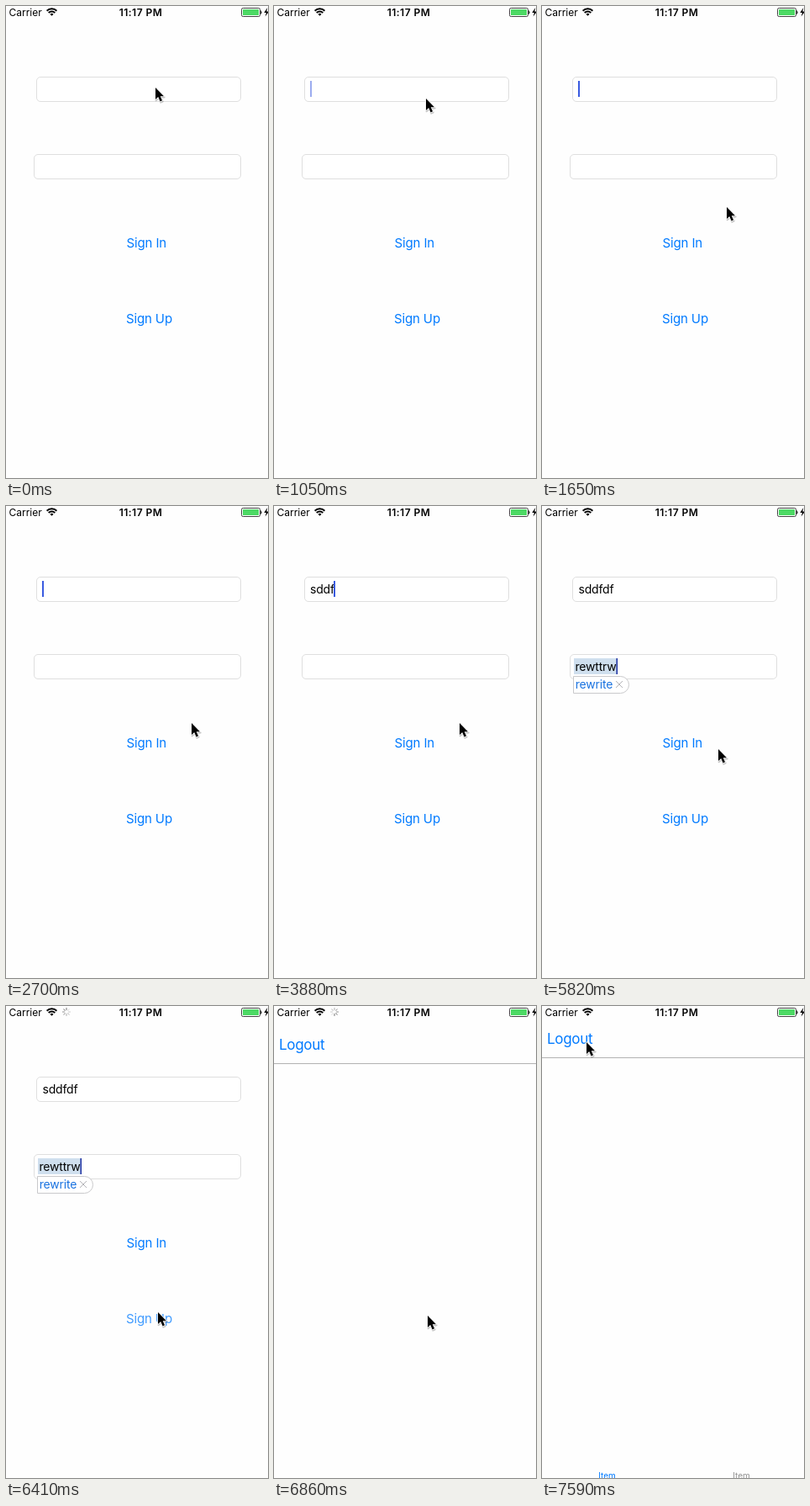
Animation of 312x561 px, one loop 8 s. Source, as an HTML page:

```html
<!DOCTYPE html>
<html lang="en">
<head>
<meta charset="utf-8">
<title>Sign in flow</title>
<style>
  html, body { margin: 0; width: 100%; height: 100%; overflow: hidden; background: #fefefe; }
  svg { display: block; width: 312px; height: 561px; }
  text { font-family: Inter, Roboto, "Liberation Sans", sans-serif; white-space: pre; }
  .field { fill: #fff; stroke: #dfdfdf; }
  .input { font-size: 14px; letter-spacing: -0.2px; }
  .button { font-size: 15px; letter-spacing: -0.15px; fill: #007aff; text-anchor: middle; }
  .status { font-size: 12px; }
  .clock { font-weight: 600; letter-spacing: 0.45px; text-anchor: middle; }
  .tab { font-size: 10px; text-anchor: middle; }
</style>
</head>
<body>
<svg viewBox="0 0 312 561">
  <rect width="312" height="561" fill="#fefefe"/>

  <g id="form">
    <rect class="field" x="36.5" y="84.5" width="243" height="29" rx="4.5"/>
    <rect class="field" x="33.5" y="176.5" width="246" height="29" rx="4.5"/>
    <rect id="mark" x="38" y="181" width="52" height="19" fill="#cfdfee"/>
    <text id="user" class="input" x="43" y="103.5"></text>
    <text id="pass" class="input" x="39.5" y="195.5"></text>
    <rect id="caret" width="2" height="19"/>
    <g id="hint">
      <path d="M37.5 202.5H93.5a10 10 0 0 1 0 20H37.5Z" fill="#fff" stroke="#c9c9cb"/>
      <text class="input" x="39.7" y="217" fill="#1a73e0">rewrite</text>
      <path d="M88 208l8 8m0-8l-8 8" stroke="#b4b4b8" fill="none"/>
    </g>
    <text class="button" x="167.3" y="286.5">Sign In</text>
    <text id="signUp" class="button" x="170.5" y="376.5">Sign Up</text>
  </g>

  <g id="modal">
    <rect width="312" height="580" fill="#fefefe"/>
    <rect y="61" width="312" height="1" fill="#b2b2b2"/>
    <text x="6" y="45" font-size="17" letter-spacing="-0.3" fill="#007aff">Logout</text>
    <text class="tab" x="77.5" y="561.5" fill="#007aff">Item</text>
    <text class="tab" x="237.5" y="561.5" fill="#929292">Item</text>
  </g>

  <text class="status" x="3.5" y="11.5">Carrier</text>
  <g fill="none" stroke="#000" stroke-width="1.9">
    <path d="M48.6 5.7a8.4 8.4 0 0 1 11.8 0M50.7 8a5.4 5.4 0 0 1 7.6 0"/>
    <path d="M54.5 11.8l-2-2a2.8 2.8 0 0 1 4 0Z" fill="#000" stroke="none"/>
  </g>
  <g id="spinner" stroke="#777" stroke-linecap="round"></g>
  <text class="status clock" x="160.5" y="11.5">11:17 PM</text>
  <rect x="280.5" y="2.5" width="22" height="10" rx="1.8" fill="#fff" stroke="#444"/>
  <rect x="282" y="4" width="19" height="7" rx="0.6" fill="#4cd964"/>
  <path d="M303.5 5.5q1.6 2 0 4Z" fill="#222" stroke="#222" stroke-width="0.6"/>
  <path d="M311.3 2l-4 6h2.6l-1.2 4.6 4.3-6h-2.7Z"/>

  <g id="cursor">
    <path d="M0 0V14L3.2 11L5.6 16.4L8 15.3L5.7 10.2H10Z" transform="translate(.6 1.2)"
      fill="#000" opacity=".22" stroke="#000" stroke-width="2" stroke-linejoin="round"/>
    <path d="M0 0V14L3.2 11L5.6 16.4L8 15.3L5.7 10.2H10Z"
      fill="#000" stroke="#fff" stroke-width="1.6" stroke-linejoin="round" paint-order="stroke"/>
  </g>
</svg>
<script>
const LOOP = 8000;
const $ = id => document.getElementById(id);

// Critically damped spring for the sheet sliding up.
const slide = t => {
  const u = 18.26 * (t - 6510) / 1000;
  return Math.round(568 * (1 + u) * Math.exp(-u));
};

const start = {
  cursor: [178, 97], user: "", pass: "", userX: 43, caret: [43, 89], blink: 0,
  hint: false, press: 1, spin: -1, sheet: 568
};

// Each step changes only the listed parts.
const steps = [
  [450, { blink: 1 }],
  [1050, { cursor: [181, 110], blink: 0.5 }],
  [1200, { cursor: [191, 143], blink: 0 }],
  [1350, { cursor: [204, 184] }],
  [1500, { cursor: [215, 218], blink: 0.5 }],
  [1650, { cursor: [220, 239], blink: 1 }],
  [1800, { cursor: [221, 251] }],
  [1950, { cursor: [221, 258] }],
  [2100, { blink: 0.5 }],
  [2250, { blink: 0 }],
  [2550, { blink: 0.5 }],
  [2700, { blink: 1 }],
  [3000, { blink: 0.5 }],
  [3140, { blink: 0 }],
  [3580, { user: "sd", caret: [57, 89], blink: 1 }],
  [3880, { user: "sddf", caret: [71, 89] }],
  [4030, { user: "sddfdf", caret: [84, 89] }],
  [4330, { userX: 43.5, caret: [40, 181] }],
  [4780, { pass: "rew", caret: [64, 181] }],
  [4930, { pass: "rewtt", caret: [74, 181] }],
  [5080, { pass: "rewttrw", caret: [88.5, 181] }],
  [5380, { hint: true }],
  [5530, { cursor: [218, 265] }],
  [5680, { cursor: [210, 289] }],
  [5830, { cursor: [198, 322] }],
  [5960, { cursor: [187, 350] }],
  [6110, { cursor: [181, 364] }],
  [6260, { press: 0.25 }],
  [6410, { press: 0.75, spin: 0 }],
  [6560, { cursor: [182, 366], press: 1, spin: 1, sheet: slide(6560) }],
  [6710, { cursor: [183, 368], spin: 3, sheet: slide(6710) }],
  [6860, { spin: 4, sheet: slide(6860) }],
  [7000, { spin: 6, sheet: 0 }],
  [7150, { cursor: [158, 312], spin: 7 }],
  [7300, { cursor: [100, 178], spin: -1 }],
  [7450, { cursor: [57, 64] }],
  [7590, { cursor: [53, 43] }]
];

const spokes = Array.from({ length: 8 }, (_, i) => {
  const line = document.createElementNS("http://www.w3.org/2000/svg", "path");
  line.setAttribute("d", "M72 4.6V2.4");
  line.setAttribute("transform", `rotate(${i * 45} 72 7)`);
  $("spinner").append(line);
  return line;
});

const move = (id, x, y) => $(id).setAttribute("transform", `translate(${x} ${y})`);
const show = (id, on) => $(id).setAttribute("visibility", on ? "visible" : "hidden");

function draw(s) {
  move("cursor", ...s.cursor);
  move("caret", ...s.caret);
  move("modal", 0, s.sheet);
  $("user").textContent = s.user;
  $("user").setAttribute("x", s.userX);
  $("pass").textContent = s.pass;
  const inPass = s.caret[1] > 100;
  $("caret").setAttribute("fill", inPass ? "#1a2fa0" : "#3a5be0");
  $("caret").setAttribute("width", inPass ? 1.5 : 2);
  $("caret").setAttribute("opacity", s.blink);
  $("signUp").setAttribute("opacity", s.press);
  show("mark", s.hint);
  show("hint", s.hint);
  show("modal", s.sheet < 561);
  show("spinner", s.spin >= 0);
  spokes.forEach((line, i) =>
    line.setAttribute("opacity", 1 - 0.75 * ((s.spin - i + 16) % 8) / 7));
}

let shown = -1;
function tick() {
  const t = performance.now() % LOOP;
  const due = steps.filter(([at]) => at <= t);
  if (due.length !== shown) {
    shown = due.length;
    draw(Object.assign({}, start, ...due.map(([, change]) => change)));
  }
  requestAnimationFrame(tick);
}
tick();
</script>
</body>
</html>
```
